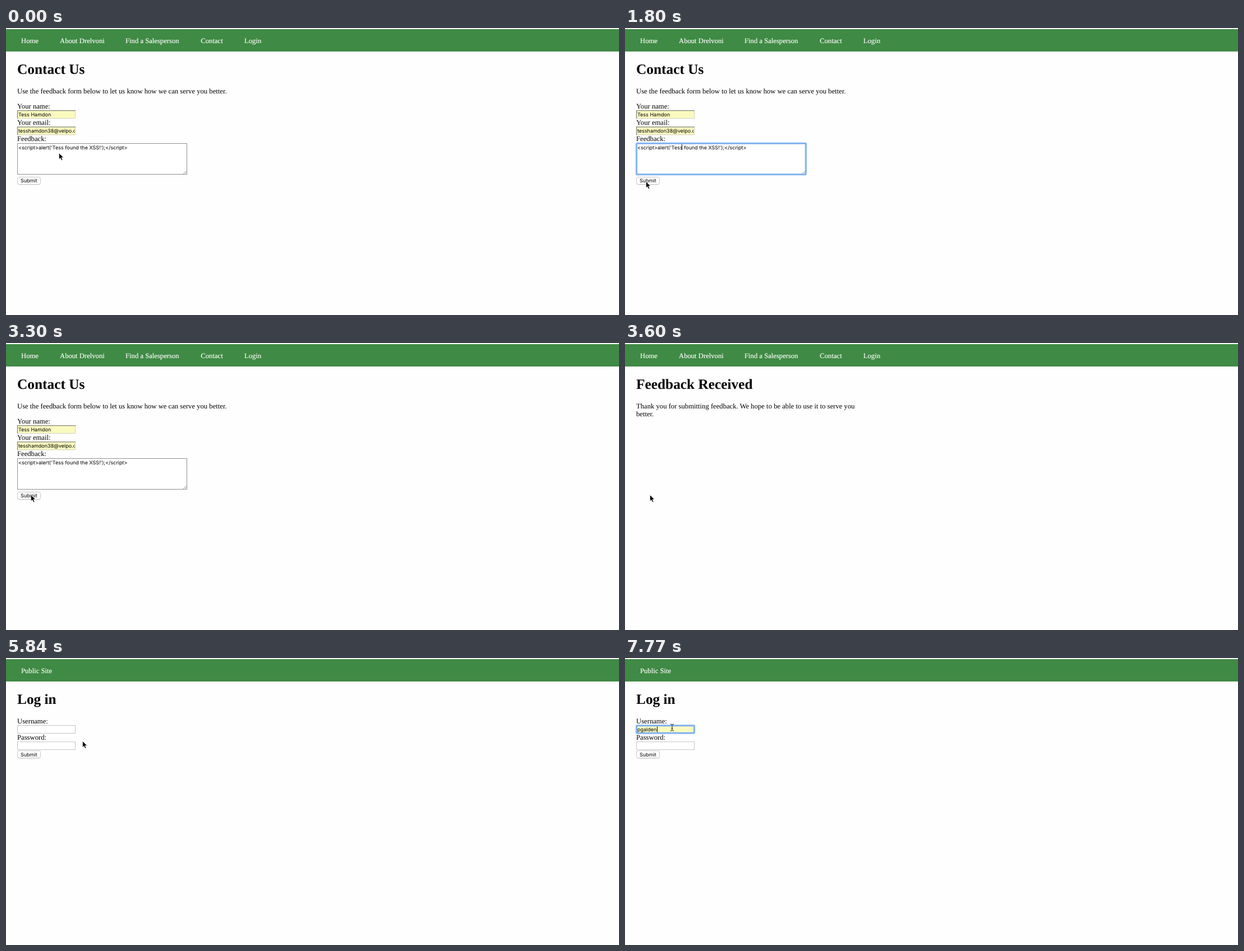
Recreate the animation shown at these times as an HTML page. Size 1093 by 513 pixels, loop 8 s.

```html
<!DOCTYPE html>
<html lang="en">
<head>
<meta charset="utf-8">
<title>Feedback form</title>
<style>
html, body { margin: 0; width: 100%; height: 100%; overflow: hidden; background: #fefefe; }
svg { display: block; width: 1093px; height: 513px; }
text { font: 12.67px "Liberation Serif", "Times New Roman", serif; text-rendering: geometricPrecision; white-space: pre; }
.title { font-size: 25.33px; font-weight: bold; }
.nav text { fill: #fff; stroke: #fff; stroke-width: .15px; }
.ui { font: 9px Inter, "Open Sans", sans-serif; }
.item { font: bold 10.63px "Liberation Sans", Arial, sans-serif; }
.box { fill: #fff; stroke: #c3c3c3; }
.auto { fill: #fafabf; }
.edge { fill: none; stroke: #848484; stroke-width: 1.3px; }
.ring { fill: none; stroke: #6fa7ee; stroke-width: 2px; }
.glow { fill: none; stroke: #a9cbf6; stroke-width: 4px; opacity: .6; }
.caret { fill: none; stroke: #000; }

/* hard cuts on one shared 8 s clock: 1% = 80 ms */
.cut { animation: 8s step-end infinite; opacity: 0; }
#public { animation-name: public; }
#contact { animation-name: contact; }
#focus { animation-name: focus; }
#blink { animation-name: blink; }
#thanks { animation-name: thanks; }
#login { animation-name: login; }
#userFocus { animation-name: userFocus; }
#emptyCaret { animation-name: emptyCaret; }
#typed1 { animation-name: typed1; }
#typed2 { animation-name: typed2; }
#filled { animation-name: filled; }
#filledCaret { animation-name: filledCaret; }
#list { animation-name: list; }
#picked { animation-name: picked; }
#arrow { animation-name: arrow; }
#beam { animation-name: beam; }

@keyframes public { 0% { opacity: 1 } 71.125%, 100% { opacity: 0 } }
@keyframes contact { 0% { opacity: 1 } 45%, 100% { opacity: 0 } }
@keyframes focus { 0% { opacity: 0 } 22.5% { opacity: 1 } 41.25%, 100% { opacity: 0 } }
@keyframes blink { 0% { opacity: 1 } 28.125% { opacity: 0 } 33.75%, 100% { opacity: 1 } }
@keyframes thanks { 0% { opacity: 0 } 45% { opacity: 1 } 71.125%, 100% { opacity: 0 } }
@keyframes login { 0% { opacity: 0 } 71.125%, 100% { opacity: 1 } }
@keyframes userFocus { 0% { opacity: 0 } 78.5%, 100% { opacity: 1 } }
@keyframes emptyCaret { 0% { opacity: 0 } 78.5% { opacity: 1 } 87.875%, 100% { opacity: 0 } }
@keyframes typed1 { 0% { opacity: 0 } 87.875% { opacity: 1 } 93.5%, 100% { opacity: 0 } }
@keyframes typed2 { 0% { opacity: 0 } 93.5% { opacity: 1 } 95.375%, 100% { opacity: 0 } }
@keyframes filled { 0% { opacity: 0 } 95.375%, 100% { opacity: 1 } }
@keyframes filledCaret { 0% { opacity: 0 } 97.125%, 100% { opacity: 1 } }
@keyframes list { 0% { opacity: 0 } 87.875% { opacity: 1 } 97.125%, 100% { opacity: 0 } }
@keyframes picked { 0% { opacity: 0 } 95.375% { opacity: 1 } 97.125%, 100% { opacity: 0 } }

@keyframes arrow {
  0% { opacity: 1; transform: translate(94px, 223px) }
  1.875% { opacity: 1; transform: translate(86px, 229px) }
  3.75% { opacity: 1; transform: translate(68px, 244px) }
  5.625% { opacity: 1; transform: translate(50px, 259px) }
  7.5% { opacity: 1; transform: translate(40px, 267px) }
  9.375% { opacity: 1; transform: translate(37px, 269px) }
  16.875% { opacity: 1; transform: translate(37px, 274px) }
  31.875% { opacity: 1; transform: translate(41px, 273px) }
  33.75% { opacity: 1; transform: translate(44px, 271px) }
  52.5% { opacity: 1; transform: translate(413px, 58px) }
  56.25% { opacity: 1; transform: translate(378px, 30px) }
  58.125% { opacity: 1; transform: translate(404px, 23px) }
  60% { opacity: 1; transform: translate(440px, 16px) }
  61.875% { opacity: 1; transform: translate(452px, 13px) }
  65.625% { opacity: 1; transform: translate(447px, 16px) }
  67.5% { opacity: 1; transform: translate(444px, 17px) }
  73% { opacity: 1; transform: translate(136px, 148px) }
  74.875%, 100% { opacity: 0; transform: translate(136px, 148px) }
}
@keyframes beam {
  0% { opacity: 0; transform: translate(104px, 132px) }
  74.875% { opacity: 1; transform: translate(104px, 132px) }
  76.75%, 100% { opacity: 1; transform: translate(84px, 124px) }
}
</style>
</head>
<body>
<svg viewBox="0 0 1093 513">
  <defs>
    <clipPath id="fieldClip"><rect x="21" y="177" width="101.5" height="14"/></clipPath>
    <g id="button">
      <rect x=".5" y="1" width="41" height="13.5" rx="3" fill="#ddd"/>
      <rect x=".5" y=".5" width="41" height="13" rx="3" fill="#fff" stroke="#c2c2c2" stroke-width=".9"/>
      <text class="ui" x="6" y="10.3">Submit</text>
    </g>
    <g id="autoField">
      <rect class="auto" width="104" height="15"/>
      <path d="M103.5 0V14.5H0" fill="none" stroke="#d0d0c4"/>
      <path class="edge" d="M.5 15V.6H104"/>
    </g>
    <rect id="field" class="box" x=".5" y=".5" width="103" height="14"/>
  </defs>

  <rect width="1093" height="2" fill="#fff"/>
  <rect y="2" width="1093" height="40" fill="#3f8a44"/>

  <g id="public" class="nav cut">
    <text x="27" y="27">Home</text>
    <text x="96" y="27">About Drelvoni</text>
    <text x="213" y="27">Find a Salesperson</text>
    <text x="347.3" y="27">Contact</text>
    <text x="425" y="27">Login</text>
  </g>

  <g id="contact" class="cut">
    <text class="title" x="20" y="82">Contact Us</text>
    <text x="20" y="117">Use the feedback form below to let us know how we can serve you better.</text>
    <text x="20" y="144">Your name:</text>
    <use href="#autoField" x="20" y="147"/>
    <text class="ui" x="22" y="158">Tess Hamdon</text>
    <text x="20" y="173">Your email:</text>
    <use href="#autoField" x="20" y="176.3"/>
    <text class="ui" x="22" y="187.3" clip-path="url(#fieldClip)">tesshamdon38@velpo.c</text>
    <text x="20" y="202.3">Feedback:</text>
    <rect x="20.5" y="206.5" width="302" height="55" fill="#fff" stroke="#8f8f8f"/>
    <path d="M316 260.5l5.5-5M319 260.5l2.5-2.3" stroke="#777" stroke-width=".8"/>
    <text class="ui" x="22" y="217">&lt;script&gt;alert('Tess found the XSS!');&lt;/script&gt;</text>
    <g id="focus" class="cut">
      <rect class="glow" x="20.5" y="206.3" width="302" height="55.5" rx="1.5"/>
      <rect class="ring" x="20.5" y="206.3" width="302" height="55.5" rx="1"/>
      <path id="blink" class="caret cut" d="M101.5 208v10"/>
    </g>
    <use href="#button" x="20" y="266"/>
  </g>

  <g id="thanks" class="cut">
    <text class="title" x="20" y="82">Feedback Received</text>
    <text x="20" y="117">Thank you for submitting feedback. We hope to be able to use it to serve you</text>
    <text x="20" y="131.3">better.</text>
  </g>

  <g id="login" class="cut">
    <g class="nav"><text x="27" y="27">Public Site</text></g>
    <text class="title" x="20" y="82">Log in</text>
    <text x="20" y="117">Username:</text>
    <use href="#field" x="20" y="120"/>
    <text x="20" y="146.3">Password:</text>
    <use href="#field" x="20" y="149.3"/>
    <use href="#button" x="20" y="165.3"/>
    <rect id="filled" class="auto cut" x="20" y="120" width="104" height="15"/>
    <g id="userFocus" class="cut">
      <rect class="glow" x="20.5" y="120.7" width="103" height="13.6" rx="1.5"/>
      <rect class="ring" x="20.5" y="120.7" width="103" height="13.6" rx="1"/>
    </g>
    <path id="emptyCaret" class="caret cut" d="M22.5 122.5v10"/>
    <g id="typed1" class="cut">
      <text class="ui" x="22" y="131">p</text>
      <path class="caret" d="M28.5 122.5v10"/>
    </g>
    <g id="typed2" class="cut">
      <text class="ui" x="22" y="131">pg</text>
      <path class="caret" d="M33.5 122.5v10"/>
    </g>
    <g id="filledCaret" class="cut"><path class="caret" d="M57.5 122.5v10"/></g>
    <g style="animation-name: filled" class="cut"><text class="ui" x="22" y="131">pgalden</text></g>
    <g id="list" class="cut">
      <rect x="20.5" y="135.5" width="103" height="39" fill="#fff" stroke="#a6cbee"/>
      <rect id="picked" class="cut" x="21" y="137" width="102" height="19" fill="#dcdcdc"/>
      <text class="item" x="27" y="150">pgalden</text>
      <text class="item" x="27" y="169">phadworne</text>
    </g>
  </g>

  <path id="arrow" class="cut" d="M.4.4V11.9L3 9.5 5 13.8 7 12.9 5.1 8.7H8.8Z" fill="#000" stroke="#fff" stroke-width=".8"/>
  <path id="beam" class="cut" d="M-3-5.8Q0-5.8 0-4Q0-5.8 3-5.8M0-4V4.5M-3 6.2Q0 6.2 0 4.5Q0 6.2 3 6.2M-1.6 1.8H1.6" fill="none" stroke="#222"/>
</svg>
</body>
</html>
```
